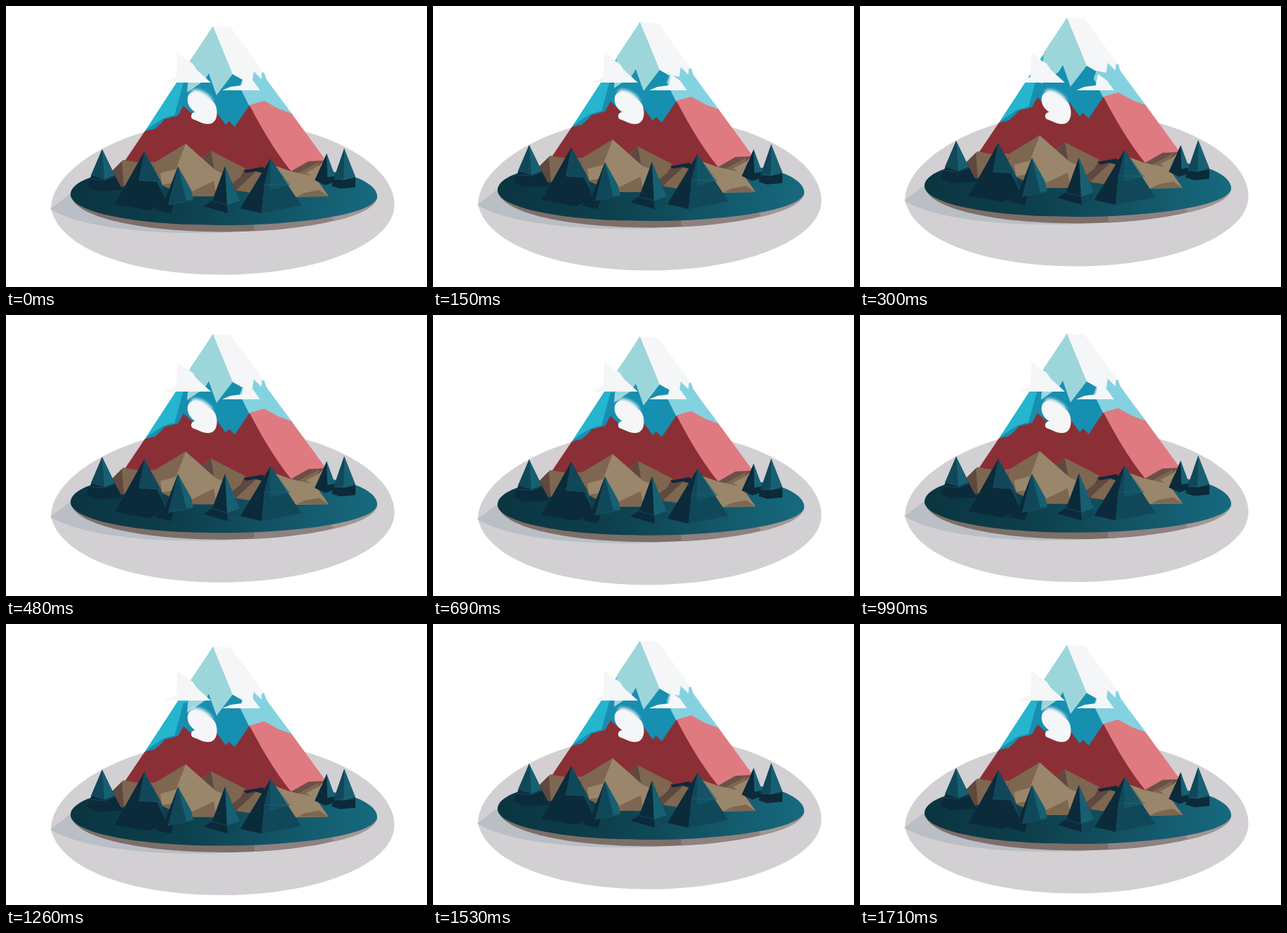
Write an HTML page that moves like this. It is 600 by 400 pixels and loops after 1780 ms.

```html
<!DOCTYPE html>
<html lang="en">
<head>
<meta charset="utf-8">
<title>Floating mountain</title>
<style>
  html, body { margin: 0; width: 100%; height: 100%; overflow: hidden; background: #fff; }
  svg { display: block; width: 600px; height: 400px; }
  .dark { fill: #0b2a3a; }
  .mid { fill: #10485a; }
  .lit { fill: #176073; }
  .earth { fill: #7d6750; }
  .sand { fill: #9a866b; }
  .soil { fill: #5f4840; }
  .snow { fill: #f5f6f8; }
</style>
</head>
<body>
<svg viewBox="0 0 600 400">
  <defs>
    <linearGradient id="grass">
      <stop offset="0" stop-color="#0a3541"/>
      <stop offset=".35" stop-color="#0d3f4c"/>
      <stop offset="1" stop-color="#176a7f"/>
    </linearGradient>
    <filter id="soft" x="-50%" y="-50%" width="200%" height="200%">
      <feGaussianBlur stdDeviation="2.2"/>
    </filter>
  </defs>

  <g id="island">
    <path fill="#d2d0d3" d="M64 288C66 224 186 163 308 163C444 163 553.500 221 553.500 283C553.500 338 444 382.500 308 382.500C180 382.500 76 346 64 288Z"/>
    <path fill="#b9bfc4" d="M63 289L96 264L200 300L325 322C215 327 110 317 63 289Z"/>

    <g id="peak">
      <path fill="#178fb1" d="M295 29L323 97L337 105L347 141L330 180L198 180Z"/>
      <path fill="#25b5cf" d="M262 80L258 109H253L240 156L225 162L221 167L198 178Z"/>
      <path fill="#178fb1" d="M198 178L207 171L224 160L240 155L224 168Z"/>
      <path fill="#9cd6db" d="M295 29L323 97L300 127L289 96L283 106L258 123L262 78Z"/>
      <path fill="#84d2e0" d="M337 104L350 92L368 95L371 104L384 122L408 154L368 142L347 143L333 115Z"/>
      <path class="snow" d="M295 29L320 30L368 95L365 92L364 104L353 93L351 107L337 104L323 97Z"/>
      <path fill="#8b2f36" d="M167 224L198 178L212 175L221 167L226 161L245 156L253 142L265 153L285 157L299 150L313 169L318 164L326 172L347 141L412 238V246H170Z"/>
      <path fill="#e07a81" d="M347 141L368 135L388 146L407 153L456 220L432 242H412Q380 205 347 141Z"/>
    </g>

    <path fill="#7e6e68" d="M92 269C98 301 190 321 310 321.500C430 321 525 298 529 272L470 260H130Z"/>
    <path fill="#8f8180" d="M353 300L354 320.500C445 316 526 297 529 272L470 260Z"/>
    <path fill="#a39694" d="M460 295L468 306C504 298 528 286 529 272L500 265Z"/>
    <path fill="url(#grass)" d="M92 268C92 252 125 238 165 236L340 240L445 234C495 236 529 254 529 271C529 295 425 312 306 312C182 312 92 293 92 268Z"/>

    <g id="hills">
      <path class="earth" d="M150 236L167 219L190 223L214 222L200 254L164 257Z"/>
      <path class="soil" d="M150 236L165 221L168 257L160 257Z"/>
      <path class="earth" d="M292 206L341 231L330 252L300 262L270 225Z"/>
      <path class="soil" d="M292 206L280 217L297 235Z"/>
      <path class="earth" d="M256 196L213 222L208 248L240 264L270 271L242 232Z"/>
      <path class="sand" d="M220 238L242 232L252 250L222 254Z"/>
      <path class="sand" d="M256 196L299 234L312 239L302 271H265L242 232Z"/>
      <path class="earth" d="M265 264L296 249L300 271H264Z"/>
      <path class="dark" d="M338 234L366 229L372 238L345 240Z"/>
      <path class="soil" d="M318 256L341 238L356 235L374 240L360 266L330 264Z"/>
      <path class="earth" d="M328 262L356 236L374 240L360 268Z"/>
      <path fill="#6c5047" d="M403 237L431 221L453 220L438 238Z"/>
      <path class="earth" d="M416 238L446 222L444 245Z"/>
      <path class="sand" d="M428 237L449 226L452 246L440 246Z"/>
      <path class="sand" d="M380 226L405 235L440 243L460 271L402 272L365 250Z"/>
      <path class="earth" d="M425 266L446 262L460 271L415 271Z"/>
    </g>

    <g id="trees">
      <path class="dark" d="M137 204L115 257L130 264L166 262L155 241Z"/>
      <path class="mid" d="M137 204L121 241L140 247Z"/>
      <path class="lit" d="M137 204L140 247L155 241Z"/>

      <path class="dark" d="M197 207L155 282L203 291L229 281L214 240Z"/>
      <path class="mid" d="M197 207L189 248L221 250Z"/>
      <path class="mid" d="M221 250L229 281L223 266L215 251Z"/>

      <path class="dark" d="M245 228L226 278L212 290L235 295L242 270Z"/>
      <path class="mid" d="M245 228L231 283L267 275Z"/>
      <path class="lit" d="M245 228L257 277L267 275L264 262Z"/>

      <path class="dark" d="M312 228L294 277L281 285L316 295L333 286L330 272Z"/>
      <path class="lit" d="M312 228L315 283L333 277Z"/>
      <path class="mid" d="M315 283L333 277V286L316 295Z"/>

      <path class="dark" d="M377 217L334 288L364 295L375 262Z"/>
      <path class="mid" d="M377 217L368 254L364 295L421 284Z"/>
      <path class="lit" d="M377 217L376 262L405 255Z" opacity=".45"/>

      <path class="dark" d="M457 210L440 248L455 255L470 250Z"/>
      <path class="lit" d="M457 210L458 244L469 242Z"/>

      <path class="dark" d="M482 203L464 256L476 260L498 258V245Z"/>
      <path class="mid" d="M482 203L467 246L481 248Z"/>
      <path class="lit" d="M482 203L481 248L498 243Z"/>

      <path fill="none" stroke="#286878" stroke-width=".5" d="M119 246L140 248L156 242M189 248L221 250M368 254L406 254M231 283L267 276M294 278L315 283L333 277M467 247L498 245"/>
    </g>
  </g>

  <g id="clouds" class="snow">
    <path d="M244 66L259 78L266 82L272 91L292 109H225L243 101Z"/>
    <path d="M308 120L320 115L336 113L339 97L352 106L362 120Z"/>
    <ellipse cx="279" cy="130" rx="17" ry="8" transform="rotate(30 279 130)" filter="url(#soft)"/>
    <path d="M260 127C256 136 262 147 270 151C264 151 262 158 266 161C273 163 279 168 288 168C299 168 302 157 300 146C299 140 296 136 292 134C285 131 281 125 272 123C266 122 262 123 260 127Z"/>
  </g>
</svg>

<script>
  const LOOP = 1780, STEP = 30, LAST = 1710, LEG = 300;
  const heights = [0, -12, 5, -6, 6, -6, 4];   // one turning point per leg
  const island = document.getElementById('island');

  function heightAt(ms) {
    const leg = Math.floor(ms / LEG);
    const part = ms / LEG - leg;
    return heights[leg] + (heights[leg + 1] - heights[leg]) * part;
  }

  function draw(now) {
    const t = Math.max(0, now - start) % LOOP;
    const ms = Math.min(Math.floor(t / STEP) * STEP, LAST);
    island.setAttribute('transform', `translate(0 ${heightAt(ms).toFixed(2)})`);
    requestAnimationFrame(draw);
  }

  const start = performance.now();
  draw(start);
</script>
</body>
</html>
```
